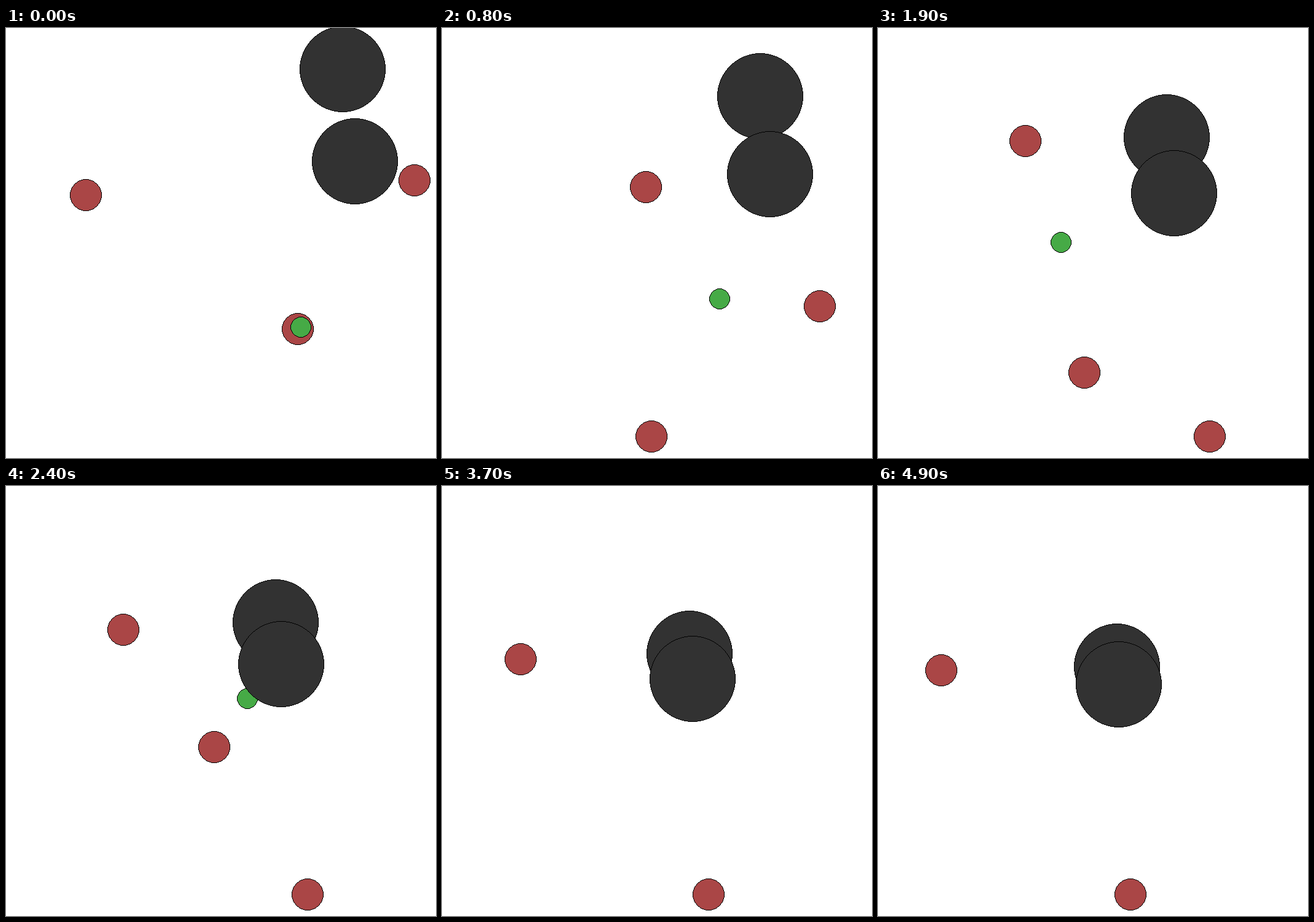
Write an HTML page with a canvas that moves like this. It is 700 px wide and 700 px high and loops after 5 s.

```html
<!DOCTYPE html>
<html lang="en">
<head>
<meta charset="utf-8">
<title>Pursuit</title>
<style>
  html, body { margin: 0; width: 100%; height: 100%; overflow: hidden; background: #fff; }
  canvas { display: block; width: 700px; height: 700px; }
</style>
</head>
<body>
<canvas id="stage" width="700" height="700"></canvas>
<script>
const ctx = document.getElementById('stage').getContext('2d');
const SIZE = 700, HALF = SIZE / 2, REACH = HALF * 0.9;
const STEP_MS = 100, STEPS = 50, DT = 0.1, KEEP = 0.75;

const DIRS = { N: [0, 0], L: [-1, 0], R: [1, 0], U: [0, -1], D: [0, 1] };

const chaser = { radius: 26, color: '#aa4646', push: 0.3, top: 1 };
const runner = { radius: 17, color: '#46aa46', push: 0.4, top: 1.3 };
const block = { radius: 70, color: '#323232' };

// plan: direction and number of steps; kick: contact impulse on the first two steps
const agents = [
  { ...chaser, pos: [-0.6097, -0.2153], plan: 'R6 U5 L7 D1 L30' },
  { ...chaser, pos: [0.875, -0.2833], plan: 'D49', kick: [-0.0025, 0] },
  { ...chaser, pos: [0.3474, 0.3915], plan: 'N2 D9 U16 R1 U1 R3 N17', kick: [-0.93, 0.58] },
  { ...runner, pos: [0.3625, 0.382], plan: 'D2 L8 U2 N6 R6 U2 N23', kick: [0.95, -0.545] }
];
const blocks = [
  { ...block, pos: [0.5525, -0.785] },
  { ...block, pos: [0.606, -0.367] }
];

// Damped motion with a speed limit
function trace({ pos, plan, push, top, kick = [0, 0] }) {
  const moves = plan.split(' ').map(p => p[0].repeat(+p.slice(1))).join('');
  let [x, y] = pos, vx = 0, vy = 0;
  const path = [[x, y]];
  [...moves].forEach((move, i) => {
    const [dx, dy] = DIRS[move], hit = i < 2 ? 1 : 0;
    vx = vx * KEEP + dx * push + kick[0] * hit;
    vy = vy * KEEP + dy * push + kick[1] * hit;
    const limit = Math.min(1, top / (Math.hypot(vx, vy) || 1));
    vx *= limit;
    vy *= limit;
    x += vx * DT;
    y += vy * DT;
    path.push([x, y]);
  });
  return path;
}

agents.forEach(a => { a.path = trace(a); });

// Midpoint circle: offsets of the rim, both octants of a quadrant
function rim(r) {
  const points = [];
  let a = 0, b = r, f = 1 - r;
  while (a < b) {
    if (f >= 0) {
      b--;
      f -= 2 * b;
    }
    a++;
    f += 2 * a + 1;
    points.push([a, b], [b, a]);
  }
  return points;
}

// Hard-edged disc with a one pixel outline
function disc(x, y, r, color) {
  const points = rim(r);
  ctx.fillStyle = color;
  for (const [a, b] of points)
    for (const row of [y + b - 1, y - b]) ctx.fillRect(x - a, row, 2 * a, 1);
  ctx.fillStyle = '#000';
  for (const [a, b] of points)
    for (const row of [y + b - 1, y - b])
      for (const col of [x + a - 1, x - a]) ctx.fillRect(col, row, 1, 1);
}

function draw(step) {
  const items = [
    ...agents.map(a => ({ ...a, pos: a.path[step] })),
    ...blocks
  ];
  // The view always reaches out to the farthest body
  const range = Math.max(...items.flatMap(e => e.pos.map(Math.abs)));
  const toScreen = v => Math.floor(v / range * REACH + HALF + 1e-6);
  ctx.fillStyle = '#fff';
  ctx.fillRect(0, 0, SIZE, SIZE);
  for (const { pos, radius, color } of items)
    disc(toScreen(pos[0]), toScreen(pos[1]), radius, color);
}

function tick() {
  draw(Math.floor(performance.now() / STEP_MS) % STEPS);
  requestAnimationFrame(tick);
}
tick();
</script>
</body>
</html>
```
